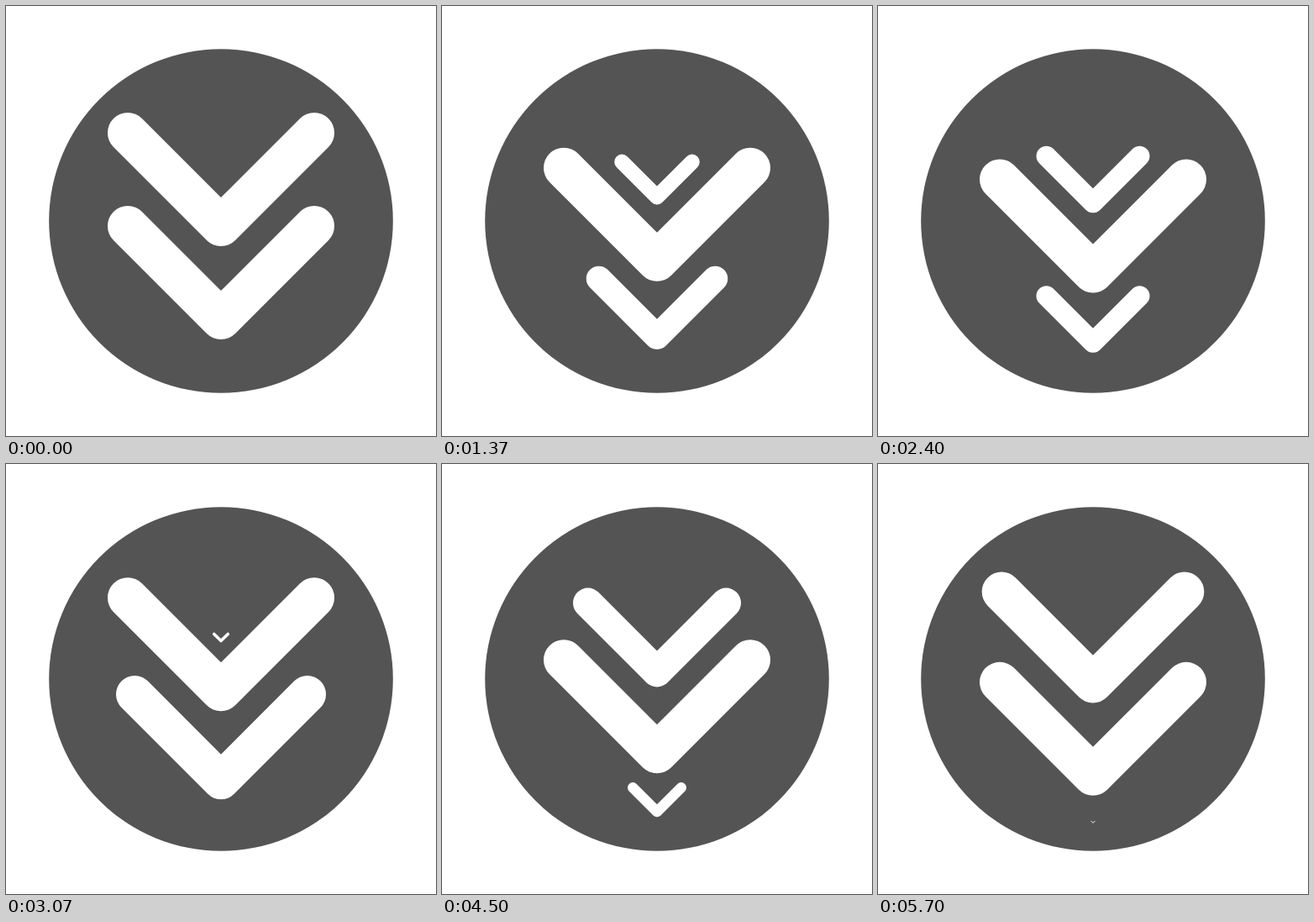
Recreate the animation shown at these times as an HTML page. Size 512x512 px, loop 5.73 s.

```html
<!DOCTYPE html>
<html lang="en">
<head>
<meta charset="utf-8">
<title>Scroll down</title>
<style>
  html, body { margin: 0; width: 100%; height: 100%; overflow: hidden; background: #fff; }
  svg { display: block; width: 100vw; height: 100vh; }
  .arrows { fill: none; stroke: #fff; stroke-width: 48; stroke-linecap: round; stroke-linejoin: round; }
</style>
</head>
<body>
<svg viewBox="0 0 512 512">
  <defs>
    <path id="chevron" d="M-111-55.5 0 55.5 111-55.5"/>
  </defs>
  <circle cx="256" cy="256" r="204.8" fill="#545454"/>
  <g class="arrows">
    <use id="top" href="#chevron"/>
    <use id="middle" href="#chevron"/>
    <use id="bottom" href="#chevron"/>
  </g>
</svg>
<script>
  const LOOP = 5730;
  const STEPS = 12;   // poses per cycle, 80 ms each
  const TOP = 206.5;
  const GAP = 111;
  const [top_, middle, bottom] = ['top', 'middle', 'bottom'].map(id => document.getElementById(id));

  const smooth = x => x * x * (3 - 2 * x);

  function place(el, y, scale) {
    el.setAttribute('transform', `translate(256 ${y}) scale(${scale})`);
    el.setAttribute('visibility', scale > 0 ? 'visible' : 'hidden');
  }

  function draw(ms) {
    // Poses change on a 30 Hz grid
    const tick = Math.floor(ms * 0.03 + 0.15);
    const pose = Math.floor(tick * 5 / 12);
    const q = smooth((pose % STEPS) / STEPS);
    place(top_, TOP, q);
    place(middle, TOP + GAP * q, 1);
    place(bottom, TOP + GAP * (1 + q), 1 - q);
  }

  const start = performance.now();
  function frame() {
    draw((performance.now() - start) % LOOP);
    requestAnimationFrame(frame);
  }
  frame();
</script>
</body>
</html>
```
